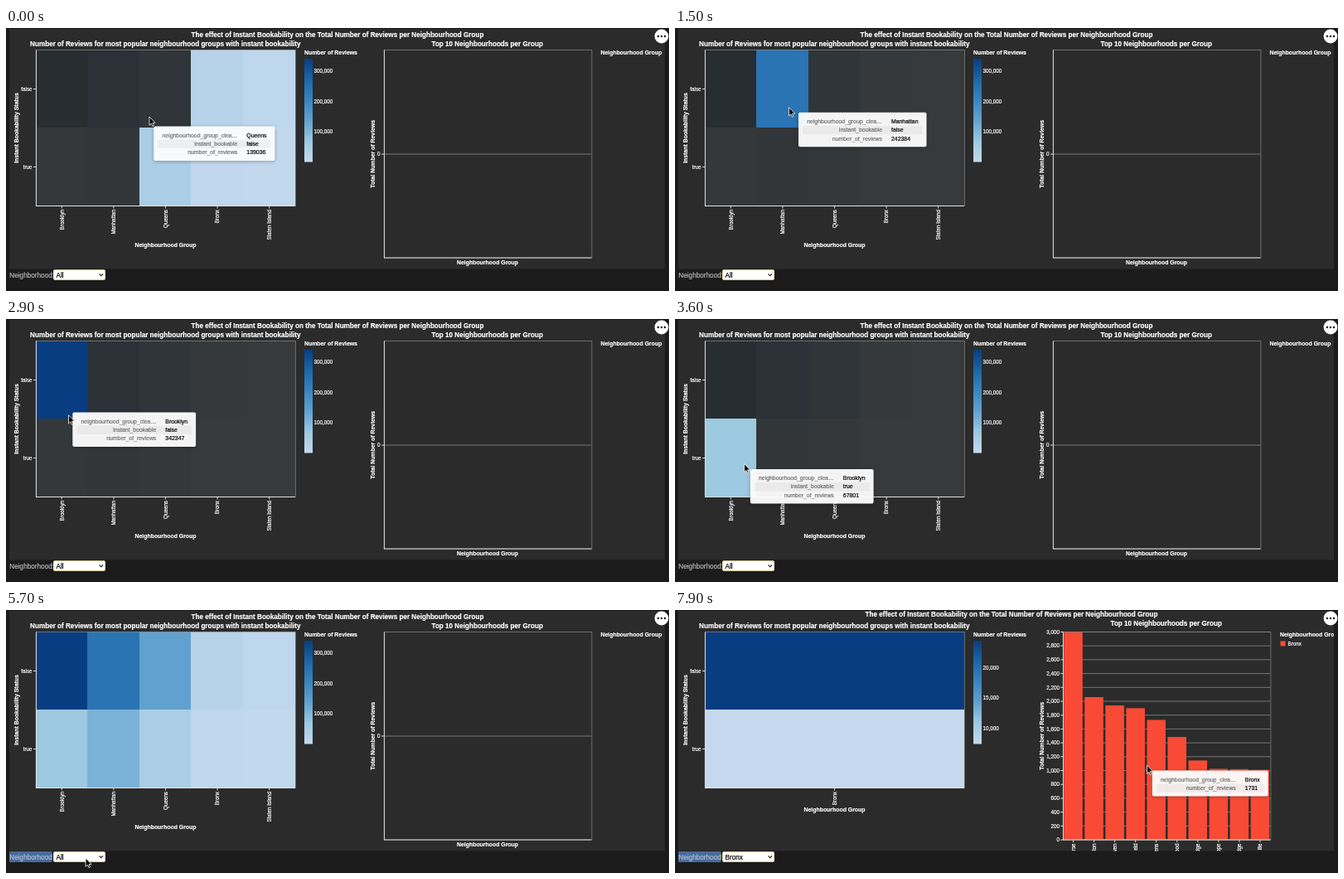
Recreate the animation shown at these times as an HTML page with a canvas. Size 800x317 px, loop 8 s.

```html
<!DOCTYPE html>
<html lang="en">
<head>
<meta charset="utf-8">
<title>Instant bookability dashboard</title>
<style>
html, body { margin: 0; width: 100%; height: 100%; overflow: hidden; background: #1b1b1b; }
canvas { display: block; width: 800px; height: 317px; }
</style>
</head>
<body>
<canvas id="stage" width="800" height="317"></canvas>
<script>
const ctx = document.getElementById('stage').getContext('2d');
const LOOP = 8000, STEP = 100, TIP_LAG = 100, HIGHLIGHT_LAG = 200;
const SELECT_AT = 4400, FILTER_AT = 7000;
const FACE = '"Liberation Sans", Arial, Helvetica, sans-serif';
const SIZE = { title: 8.14, axis: 6.9, label: 6.27, form: 8.2 };
const WHITE = '#fff', GREY = '#888', PANEL = '#2b2b2b', RED = '#f94a35';
const DIM = 0.08;

const heat = { x: 36, y: 26.5, w: 313, h: 188 };
const groups = ['Brooklyn', 'Manhattan', 'Queens', 'Bronx', 'Staten Island'];
const reviews = [[342347, 242384, 139036, 24480, 8210], [67801, 108120, 46310, 7310, 3480]];
const BRONX = groups.indexOf('Bronx');
const ramp = ['#c4d9ee', '#9dc9e1', '#62a2cf', '#3a85c0', '#1c66a8', '#083d81'];

const bars = [3000, 2060, 1940, 1900, 1731, 1485, 1145, 1025, 1020, 1010];
const barEnds = 'rse ton ven eld ens ood dge ope dge ille'.split(' ');
const barPlot = { x: 468, y: 26.5, w: 250.5, h: 250.5 };
const barStep = barPlot.w / bars.length;
const barHeight = v => barPlot.h * v / 3000;

// pointer key points: time, x, y
const path = [
  [-100, 172, 112], [0, 173, 107], [500, 168.5, 93], [900, 168.5, 93],
  [1800, 122, 97], [2100, 78, 101], [2800, 74, 106], [3500, 84.5, 174.5],
  [4200, 78, 174], [4700, 78, 174], [5600, 95, 299], [6500, 105, 300],
  [6900, 190.5, 287], [7200, 273, 264], [7800, 569.5, 187]
];

const mix = (a, b, k) => a + (b - a) * k;

function pointerAt(t) {
  const i = path.findIndex(p => p[0] > t);
  if (i < 0) return path[path.length - 1].slice(1);
  const [t0, x0, y0] = path[i - 1], [t1, x1, y1] = path[i];
  const k = (t - t0) / (t1 - t0);
  return [mix(x0, x1, k), mix(y0, y1, k)];
}

function rampColor(k) {
  const pos = k * (ramp.length - 1), i = Math.min(Math.floor(pos), ramp.length - 2);
  const channel = (hex, n) => parseInt(hex.slice(1 + n * 2, 3 + n * 2), 16);
  const rgb = [0, 1, 2].map(n => Math.round(mix(channel(ramp[i], n), channel(ramp[i + 1], n), pos - i)));
  return `rgb(${rgb})`;
}

function rect(x, y, w, h, color) {
  ctx.fillStyle = color;
  ctx.fillRect(x, y, w, h);
}

function line(x1, y1, x2, y2, color = WHITE) {
  ctx.strokeStyle = color;
  ctx.lineWidth = 0.8;
  ctx.beginPath();
  ctx.moveTo(x1, y1);
  ctx.lineTo(x2, y2);
  ctx.stroke();
}

// y is the middle of the capitals
function text(str, x, y, size, { align = 'left', bold = false, color = WHITE, up = false } = {}) {
  ctx.save();
  ctx.translate(x, y);
  if (up) ctx.rotate(-Math.PI / 2);
  ctx.font = `${bold ? 'bold ' : ''}${size}px ${FACE}`;
  ctx.textAlign = align;
  ctx.fillStyle = ctx.strokeStyle = color;
  ctx.lineWidth = 0.2;
  ctx.fillText(str, 0, size * 0.355);
  ctx.strokeText(str, 0, size * 0.355);
  ctx.restore();
}

function heading(str, x, y, size, extra) {
  text(str, x, y, size, { align: 'center', bold: true, ...extra });
}

function frame({ x, y, w, h }) {
  ctx.strokeStyle = GREY;
  ctx.lineWidth = 0.7;
  ctx.strokeRect(x + 0.4, y, w, h);
  line(x + 0.4, y, x + 0.4, y + h);
  line(x, y + h, x + w, y + h);
}

function inHeat(x, y) {
  const col = Math.floor((x - heat.x) / heat.w * groups.length);
  const row = Math.floor((y - heat.y) / heat.h * 2);
  return reviews[row]?.[col] === undefined ? null : { row, col };
}

// The picture catches up with the pointer a little late.
function isLit(t, row, col) {
  if (t >= SELECT_AT) return true;
  if (t < 300) return reviews[row][col] < 50000;
  if (t < 1100 && row === 1 && col === 1) return true;
  const hover = inHeat(...pointerAt(t - HIGHLIGHT_LAG));
  return hover.row === row && hover.col === col;
}

function drawCells(t, filtered) {
  const rows = filtered ? reviews.map(r => [r[BRONX]]) : reviews;
  const max = rows[0][0], min = filtered ? rows[1][0] : 0;
  rows.forEach((values, row) => values.forEach((v, col) => {
    const x = i => Math.floor(heat.x + heat.w * i / values.length);
    const y = i => Math.floor(heat.y + heat.h * i / 2);
    ctx.globalAlpha = filtered || isLit(t, row, col) ? 1 : DIM;
    rect(x(col), y(row), x(col + 1) - x(col), y(row + 1) - y(row), rampColor((v - min) / (max - min)));
  }));
  ctx.globalAlpha = 1;
}

function drawHeat(t, filtered) {
  const { x, y, w, h } = heat;
  drawCells(t, filtered);
  frame(heat);
  heading('Number of Reviews for most popular neighbourhood groups with instant bookability',
    192.3, 19.3, SIZE.title);
  heading('Instant Bookability Status', 12.5, 120.5, SIZE.axis, { up: true });
  ['false', 'true'].forEach((name, row) => {
    const cy = y + h * (row + 0.5) / 2;
    line(33, cy, x, cy);
    text(name, 31.5, cy, SIZE.label, { align: 'right' });
  });
  const names = filtered ? ['Bronx'] : groups;
  names.forEach((name, i) => {
    const cx = x + w * (i + 0.5) / names.length;
    line(cx, y + h, cx, y + h + 3);
    text(name, cx, 219, SIZE.label, { align: 'right', up: true });
  });
  heading('Neighbourhood Group', 192.5, filtered ? 241 : 261.5, SIZE.axis);

  text('Number of Reviews', 360, 30, SIZE.axis, { bold: true });
  const fill = ctx.createLinearGradient(0, 161.5, 0, 37);
  ramp.forEach((c, i) => fill.addColorStop(i / (ramp.length - 1), c));
  rect(360, 37, 10, 124.5, fill);
  const marks = filtered ? ['20,000', '15,000', '10,000'] : ['300,000', '200,000', '100,000'];
  marks.forEach((m, i) => text(m, 371.5, (filtered ? 69.5 : 52) + i * 36.5, SIZE.label));
}

function drawBarTitles(x, y, legendX) {
  heading('Top 10 Neighbourhoods per Group', x + 124.7, y, SIZE.title);
  heading('Total Number of Reviews', 442.3, 151.8, SIZE.axis, { up: true });
  text('Neighbourhood Group', legendX, 30, SIZE.axis, { bold: true });
}

function drawEmptyBars() {
  const plot = { ...barPlot, x: 456 }, right = plot.x + plot.w;
  drawBarTitles(plot.x, 19.3, 717.5);
  line(plot.x - 3, 152, plot.x, 152);
  line(plot.x, 152, right, 152, GREY);
  text('0', plot.x - 4.5, 152, SIZE.label, { align: 'right' });
  frame(plot);
  heading('Neighbourhood Group', 581, 283, SIZE.axis);
}

function drawBars() {
  const { x, y, w, h } = barPlot, base = y + h;
  drawBarTitles(x, 16, 730);
  for (let v = 0; v <= 3000; v += 200) {
    const gy = base - barHeight(v);
    line(x, gy, x + w, gy, GREY);
    line(x - 3, gy, x, gy);
    text(v.toLocaleString('en-US'), x - 4, gy, SIZE.label, { align: 'right' });
  }
  bars.forEach((v, i) => {
    const cx = x + (i + 0.5) * barStep;
    rect(cx - barStep * 0.45, base - barHeight(v), barStep * 0.9, barHeight(v), RED);
    line(cx, base, cx, base + 3);
    text(barEnds[i], cx, base + 4.5, SIZE.label, { align: 'right', up: true });
  });
  frame(barPlot);
  rect(730.5, 37.5, 6, 6, RED);
  text('Bronx', 739.5, 40.5, SIZE.label);
}

function drawForm(t, filtered) {
  const selected = t >= SELECT_AT;
  if (selected) rect(4, 291, 51.5, 13, '#466b9d');
  text(selected ? 'Neighborhood' : 'Neighborhood:', 4.3, 297.7, SIZE.form,
    { color: selected ? '#b0bccd' : '#b4b4b4' });
  if (selected) text(':', 54.5, 297.7, SIZE.form, { color: GREY });
  ctx.beginPath();
  ctx.roundRect(57.5, 291.7, 62, 11.6, 1);
  ctx.fillStyle = WHITE;
  ctx.fill();
  ctx.strokeStyle = '#eee2a0';
  ctx.lineWidth = 1;
  ctx.stroke();
  text(filtered ? 'Bronx' : 'All', 60.5, 297.6, SIZE.form, { color: '#000' });
  ctx.strokeStyle = '#222';
  ctx.lineWidth = 1.2;
  ctx.beginPath();
  ctx.moveTo(112.5, 296.3);
  ctx.lineTo(114.8, 298.7);
  ctx.lineTo(117.1, 296.3);
  ctx.stroke();
}

function drawMenuButton() {
  const dot = (x, r, color) => {
    ctx.fillStyle = color;
    ctx.beginPath();
    ctx.arc(x, 10, r, 0, Math.PI * 2);
    ctx.fill();
  };
  dot(791, 8.4, WHITE);
  for (const x of [787, 791, 795]) dot(x, 1.25, '#111');
}

function hoverRows(x, y, filtered) {
  const key = 'neighbourhood_group_clea…';
  const cell = inHeat(x, y);
  if (cell) {
    const col = filtered ? BRONX : cell.col;
    return [[key, groups[col]], ['instant_bookable', cell.row ? 'true' : 'false'],
            ['number_of_reviews', String(reviews[cell.row][col])]];
  }
  const value = bars[Math.floor((x - barPlot.x) / barStep)];
  const depth = barPlot.y + barPlot.h - y;
  if (filtered && depth > 0 && depth < barHeight(value))
    return [[key, 'Bronx'], ['number_of_reviews', String(value)]];
  return null;
}

function drawTooltip(x, y, rows) {
  ctx.font = `${SIZE.axis}px ${FACE}`;
  const w = 122 + Math.max(...rows.map(r => ctx.measureText(r[1]).width));
  const h = 10 + rows.length * 10.5;
  ctx.save();
  ctx.shadowColor = 'rgba(0,0,0,.3)';
  ctx.shadowBlur = 4;
  ctx.shadowOffsetY = 1;
  ctx.fillStyle = 'rgba(255,255,255,.95)';
  ctx.beginPath();
  ctx.roundRect(x, y, w, h, 2);
  ctx.fill();
  ctx.restore();
  rect(x + 5, y + 16, w - 10, 10.3, 'rgba(0,0,0,.045)');
  rows.forEach(([key, value], i) => {
    const cy = y + 10.5 + i * 10.4;
    text(key, x + 101, cy, SIZE.axis, { align: 'right', color: '#707070' });
    text(value, x + 112, cy, SIZE.axis, { color: '#000' });
  });
}

function drawPointer(x, y) {
  ctx.save();
  ctx.translate(x, y);
  const arrow = new Path2D('M0 0V10.2L2.3 8.1L3.9 11.5L5.4 10.8L3.9 7.5L7 7.2Z');
  ctx.fillStyle = '#000';
  ctx.fill(arrow);
  ctx.strokeStyle = WHITE;
  ctx.lineWidth = 0.8;
  ctx.stroke(arrow);
  ctx.restore();
}

function draw(t) {
  const filtered = t >= FILTER_AT;
  rect(0, 0, 800, 317, '#1b1b1b');
  ctx.save();
  ctx.beginPath();
  ctx.rect(4, 1, 791, 289.5);
  ctx.clip();
  rect(4, 1, 791, 290, PANEL);
  heading('The effect of Instant Bookability on the Total Number of Reviews per Neighbourhood Group',
    filtered ? 406 : 400, filtered ? 5 : 8, SIZE.title);
  drawHeat(t, filtered);
  if (filtered) drawBars();
  else drawEmptyBars();
  ctx.restore();
  drawForm(t, filtered);
  drawMenuButton();
  const [x, y] = pointerAt(t), [tipX, tipY] = pointerAt(t - TIP_LAG);
  const rows = hoverRows(x, y, filtered);
  if (rows) drawTooltip(tipX + 6.3, tipY + 6.6, rows);
  drawPointer(x, y);
}

const start = performance.now();
function tick() {
  const t = Math.max(0, performance.now() - start) % LOOP;
  draw(Math.floor(t / STEP) * STEP);
  requestAnimationFrame(tick);
}
tick();
</script>
</body>
</html>
```
